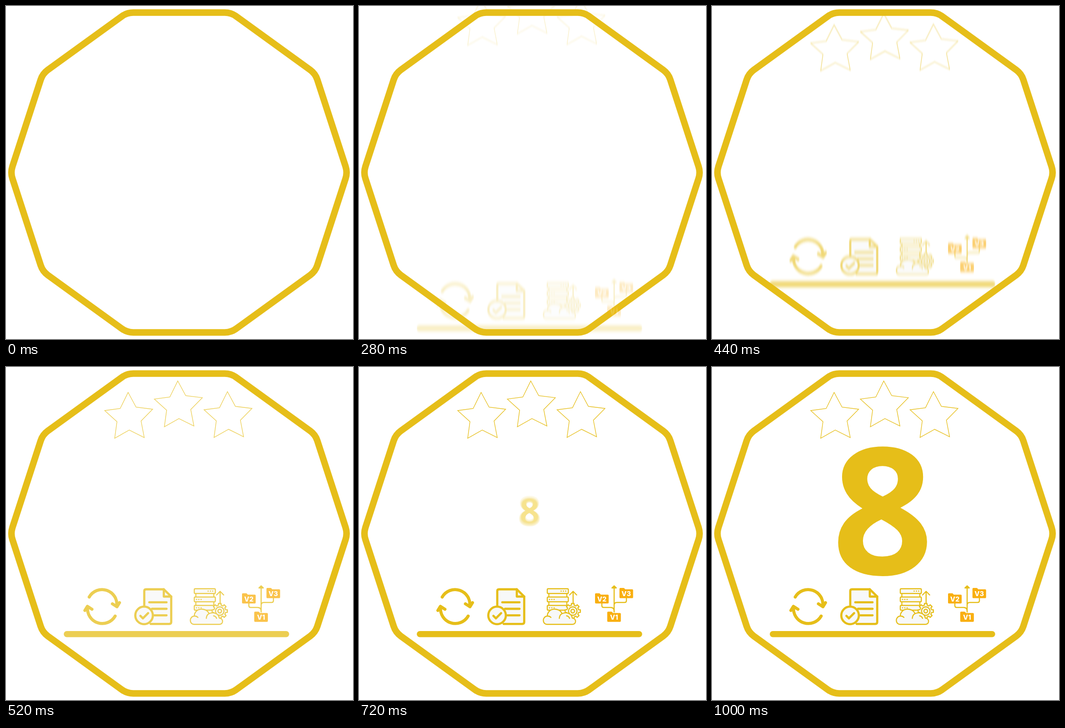
An HTML page that plays this animation: 763x734 px, repeating every 2880 ms.

```html
<!DOCTYPE html>
<html lang="en">
<head>
<meta charset="utf-8">
<title>Level badge</title>
<style>
  html, body { margin: 0; width: 100%; height: 100%; overflow: hidden; background: #fff; }
  svg { display: block; width: 763px; height: 734px; }
  .line { fill: none; stroke: #e6be19; stroke-linecap: round; stroke-linejoin: round; }
  .pale { fill: #f7f8f8; }
  .dot { fill: #e6be19; }
  .folder { fill: #f9af10; }
  .tag { font: 800 14.5px Inter, sans-serif; fill: #fff; text-anchor: middle; }
  .digit { font: 700 390px "Open Sans", "Noto Sans", sans-serif; fill: #e6be19; text-anchor: middle; }
  #digit { isolation: isolate; }
  #digit use { mix-blend-mode: plus-lighter; }
</style>
</head>
<body>
<svg viewBox="0 0 763 734" xmlns="http://www.w3.org/2000/svg">
  <defs>
    <filter id="starBlur" filterUnits="userSpaceOnUse" x="0" y="-100" width="763" height="1000" color-interpolation-filters="sRGB">
      <feGaussianBlur stdDeviation="0"/>
    </filter>
    <filter id="toolBlur" filterUnits="userSpaceOnUse" x="0" y="-100" width="763" height="1000" color-interpolation-filters="sRGB">
      <feGaussianBlur stdDeviation="0"/>
    </filter>
    <path id="star" d="M268.5 56L286 88.5L322.5 93L297 119L304 155.5L271 139L239 157L244 120.5L217 96L251 91.5Z"/>
    <path id="folder" d="M2 0H9Q10.5 0 11.5 1.5L12.5 3H28Q30 3 30 5V20.5Q30 22.5 28 22.5H2Q0 22.5 0 20.5V2Q0 0 2 0Z"/>
    <text id="eight" class="digit" x="375" y="457.2">8</text>
  </defs>

  <path id="frame" class="line" stroke-width="14.5"/>

  <g id="stars" class="line" stroke-width="1.3" style="stroke-linejoin:miter">
    <use href="#star"/>
    <use href="#star" x="109.2" y="-25.3"/>
    <use href="#star" x="218.4" y="-1.7"/>
  </g>

  <g id="tools">
    <path class="line" stroke-width="13.4" d="M133.7 588.8H616"/>

    <g class="line" stroke-width="6.8">
      <path d="M183 507A32.5 32.5 0 0 1 243.5 527M234 522L244 528.5L249.5 519.5"/>
      <path d="M240 549A32.5 32.5 0 0 1 179.5 529M189 534L179 527.5L173.5 536.5"/>
    </g>

    <g class="line" stroke-width="4.8">
      <path class="pale" d="M304 547V494Q304 490 308 490H347L363.3 506V562Q363.3 566.3 359 566.3H318"/>
      <path d="M347 490V506H363.3M315 518.7H353M321 533H353M326 547.3H353"/>
      <circle class="pale" cx="303.6" cy="547.5" r="19.3"/>
      <path d="M295.5 548.5L301 554L312.5 542.5"/>
    </g>

    <g class="line" stroke-width="2.4">
      <path d="M417.5 499V507M457 499V507M417.5 517.5V526M457 517.5V526"/>
      <g class="pale">
        <rect x="414" y="488.7" width="46.3" height="10.5" rx="2"/>
        <rect x="414" y="507" width="46.3" height="10.5" rx="2"/>
        <rect x="414" y="525.5" width="46.3" height="10.5" rx="2"/>
      </g>
      <path d="M470.8 523V495M463 502.5L470.8 494.5L478.6 502.5"/>
      <path id="gear" class="pale"/>
      <circle cx="470" cy="538" r="9.3"/>
      <circle cx="470" cy="538" r="4"/>
      <path class="pale" d="M413.5 567.2C402.5 567.2 402.5 550 414 549C414.5 530.5 440 529 446.5 543.5C456 539.5 468 543.5 469 553.5C478.5 554 478.5 567.2 469.5 567.2Z"/>
      <path d="M414 549Q419 548.5 422 552M446.5 543.5Q440.5 547 440.5 554M456.5 548.5Q461.5 549.5 463 554"/>
    </g>
    <g id="lights" class="dot"></g>

    <g class="line" stroke-width="2.5">
      <path d="M561 540V484M534 521V526Q534 530 538 530H553Q561 530 561 538M588 510V515Q588 519 584 519H567Q561 519 561 525"/>
      <path class="dot" d="M556.3 487L561 482.5L565.7 487Z"/>
    </g>
    <g id="versions"></g>
  </g>

  <g id="digit"></g>
</svg>

<script>
const LOOP = 2880, STEP = 40, MOVE = 360, SHUTTER = 20, COPIES = 10;
const $ = id => document.getElementById(id);
const clamp = x => Math.max(0, Math.min(1, x));
const polar = (cx, cy, r, a) => [cx + r * Math.cos(a), cy + r * Math.sin(a)];

// Decagon with softened corners
function decagon(cx, cy, r, cut) {
  const at = i => polar(cx, cy, r, i * Math.PI / 5);
  const toward = (a, b) => {
    const k = cut / Math.hypot(b[0] - a[0], b[1] - a[1]);
    return [a[0] + (b[0] - a[0]) * k, a[1] + (b[1] - a[1]) * k];
  };
  let d = "";
  for (let i = 0; i < 10; i++) {
    const p = at(i);
    d += `${i ? "L" : "M"}${toward(p, at(i - 1))}Q${p} ${toward(p, at(i + 1))}`;
  }
  return d + "Z";
}

function gear(cx, cy, inner, outer, teeth) {
  const points = [];
  for (let i = 0; i < teeth; i++) {
    const a = i * 2 * Math.PI / teeth;
    for (const [r, turn] of [[inner, -.24], [outer, -.17], [outer, .17], [inner, .24]])
      points.push(polar(cx, cy, r, a + turn));
  }
  return "M" + points.join("L") + "Z";
}

$("frame").setAttribute("d", decagon(380.4, 367, 370.6, 14));
$("gear").setAttribute("d", gear(470, 538, 13.2, 17, 8));
$("lights").innerHTML = [[444.5, 494], [419, 512.3], [419, 530.8]].map(([x, y]) =>
  [0, 1, 2].map(i => `<circle cx="${x + i * 5}" cy="${y}" r="1.4"/>`).join("")).join("");
$("versions").innerHTML = [["V2", 519, 498.7], ["V3", 572.7, 487], ["V1", 545.8, 539.3]].map(([label, x, y]) =>
  `<use href="#folder" class="folder" x="${x}" y="${y}"/><text class="tag" x="${x + 15}" y="${y + 18}">${label}</text>`).join("");
$("digit").innerHTML = '<use href="#eight"/>'.repeat(COPIES);
const copies = [...$("digit").children];

// Short acceleration, steady travel, longer braking
const RISE = .09, FALL = .222, SPEED = 2 / (2 - RISE - FALL);
function travel(p) {
  if (p <= 0) return [0, 0];
  if (p >= 1) return [1, 0];
  if (p < RISE) return [SPEED * p * p / RISE / 2, SPEED * p / RISE];
  const q = 1 - p;
  if (q < FALL) return [1 - SPEED * q * q / FALL / 2, SPEED * q / FALL];
  return [SPEED * (p - RISE / 2), SPEED];
}

function slide(id, blurId, distance, t) {
  const [pos, speed] = travel((t - 160) / MOVE);
  const el = $(id), sigma = Math.abs(distance) * speed * SHUTTER / MOVE / Math.sqrt(12);
  el.setAttribute("transform", `translate(0 ${distance * (1 - pos)})`);
  el.setAttribute("opacity", clamp((t - 160) / 480));
  if (sigma > .05) {
    $(blurId).firstElementChild.setAttribute("stdDeviation", `0 ${sigma}`);
    el.setAttribute("filter", `url(#${blurId})`);
  } else el.removeAttribute("filter");
}

function zoom(t) {
  const [size, speed] = travel((t - 640) / MOVE);
  const spread = speed * SHUTTER / MOVE;
  $("digit").setAttribute("opacity", clamp((t - 640) / 160));
  copies.forEach((el, i) => {
    const s = Math.max(0, size + spread * ((i + .5) / COPIES - .5));
    el.setAttribute("transform", `translate(375 318) scale(${s}) translate(-375 -318)`);
    el.setAttribute("opacity", spread ? 1 / COPIES : i ? 0 : 1);
  });
}

function draw(time) {
  const t = Math.floor(time % LOOP / STEP) * STEP;
  slide("stars", "starBlur", -107, t);
  slide("tools", "toolBlur", 185, t);
  zoom(t);
}

const start = performance.now();
function tick() {
  draw(performance.now() - start);
  requestAnimationFrame(tick);
}
tick();
</script>
</body>
</html>
```
